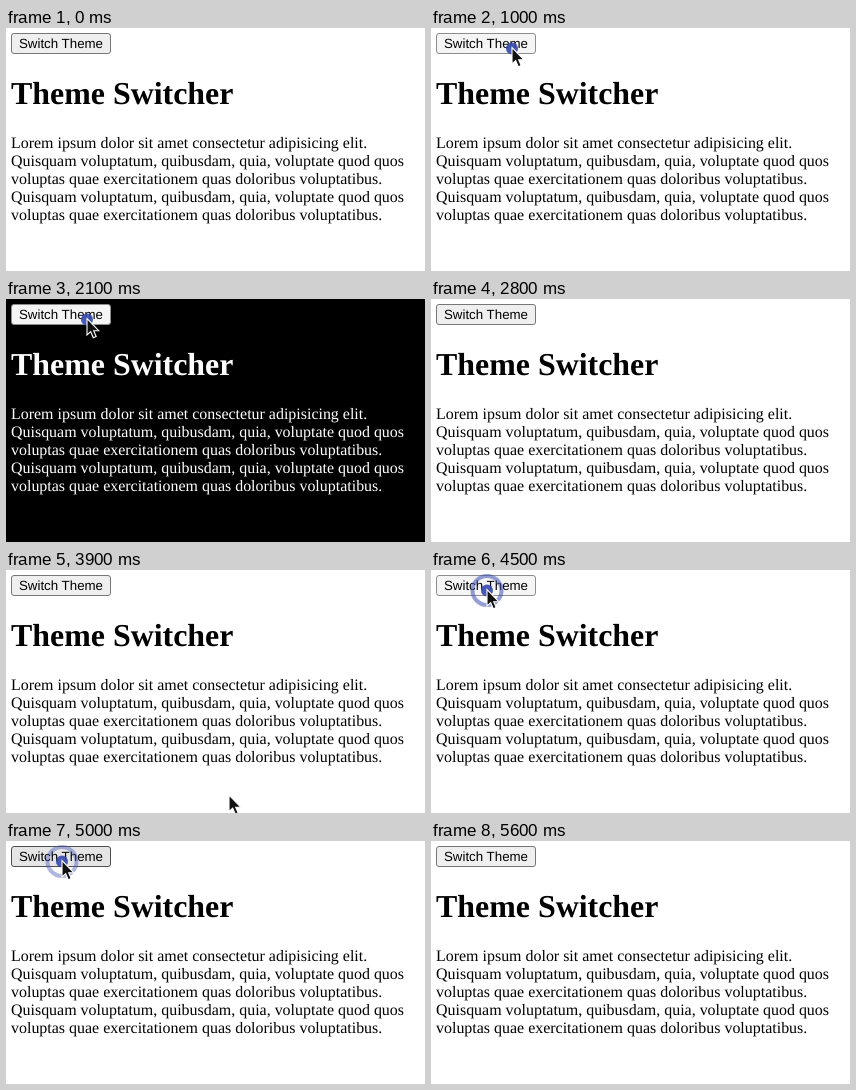
An HTML page that plays this animation: 419x243 px, repeating every 5.8 s.

```html
<!DOCTYPE html>
<html lang="en">
<head>
<meta charset="utf-8">
<title>Theme Switcher</title>
<style>
  html, body { margin: 0; width: 100%; height: 100%; overflow: hidden; }
  svg { display: block; width: 419px; height: 243px; background: #fff; fill: #000; font: 15.96px "Liberation Serif", "Times New Roman", serif; text-rendering: geometricPrecision; }
  svg.dark { background: #000; fill: #fff; }
  .title { font-size: 31.92px; font-weight: bold; }
  .label { font: 13.3px "Liberation Sans", Arial, sans-serif; fill: #000; }
  #button { fill: #efefef; stroke: #767676; }
  #button.hover { fill: #e5e5e5; stroke: #4f4f4f; }
  #button.active { fill: #f5f5f5; stroke: #8d8d8d; }
</style>
</head>
<body>
<svg id="page" viewBox="0 0 419 243">
  <rect id="button" x="5.5" y="5.5" width="99" height="20" rx="2.5"/>
  <text class="label" x="13" y="20">Switch Theme</text>
  <text class="title" x="5" y="76">Theme Switcher</text>
  <text x="5" y="120">Lorem ipsum dolor sit amet consectetur adipisicing elit.</text>
  <text x="5" y="138">Quisquam voluptatum, quibusdam, quia, voluptate quod quos</text>
  <text x="5" y="156">voluptas quae exercitationem quas doloribus voluptatibus.</text>
  <text x="5" y="174">Quisquam voluptatum, quibusdam, quia, voluptate quod quos</text>
  <text x="5" y="192">voluptas quae exercitationem quas doloribus voluptatibus.</text>
  <g id="pointer">
    <circle id="ring" r="14.5" fill="none" stroke="#3f51b5" stroke-width="4"/>
    <circle id="dot" r="6" fill="#3549ac" opacity=".9"/>
    <path d="M0 -1V15.5L3.7 12.2L6.3 18.2L9.2 17L6.7 11.2H11.8Z" fill="#111" stroke="#fff" stroke-width="1.1"/>
  </g>
</svg>
<script>
  const LOOP = 5800, STEP = 100, RING = 400;
  const page = document.getElementById("page");
  const [button, pointer, ring, dot] =
    ["button", "pointer", "ring", "dot"].map(id => document.getElementById(id));

  // The pointer enters, rests on the button, then leaves
  const visits = [
    { enter: 100, arrive: 600, depart: 2300, exit: 2700, from: [226, 223], rest: [81, 20.5], to: [258, 226] },
    { enter: 3900, arrive: 4400, depart: 5000, exit: 5500, from: [223, 226], rest: [56, 20.5], to: [221, 217] }
  ];
  const presses = [1000, 2100, 4400, 4800];

  const ease = k => k * k * (3 - 2 * k);
  const progress = (t, a, b) => ease(Math.min(1, Math.max(0, (t - a) / (b - a))));
  const mix = (a, b, k) => a.map((v, i) => v + (b[i] - v) * k);

  function locate(v, t) {
    return t < v.depart
      ? mix(v.from, v.rest, progress(t, v.enter, v.arrive))
      : mix(v.rest, v.to, progress(t, v.depart, v.exit));
  }

  function draw() {
    const t = Math.floor((performance.now() - start) % LOOP / STEP) * STEP;
    const visit = visits.find(v => t >= v.enter && t <= v.exit);
    const age = t - presses.filter(p => p <= t).pop();   // NaN before the first press
    const ringAge = age - STEP;

    // The theme flips one step after each release
    const flips = presses.filter(p => t >= p + 2 * STEP).length;
    page.classList.toggle("dark", flips % 2 === 1);

    const hover = visit && t > visit.arrive - STEP && t <= visit.depart;
    button.setAttribute("class", age <= STEP ? "active" : hover ? "hover" : "");

    pointer.style.display = visit ? "" : "none";
    if (visit) pointer.setAttribute("transform", `translate(${locate(visit, t)})`);
    dot.style.display = age <= 2 * STEP ? "" : "none";
    ring.style.opacity = ringAge >= 0 && ringAge < RING ? 0.55 * (1 - ringAge / RING) : 0;
    requestAnimationFrame(draw);
  }

  const start = performance.now();
  draw();
</script>
</body>
</html>
```
